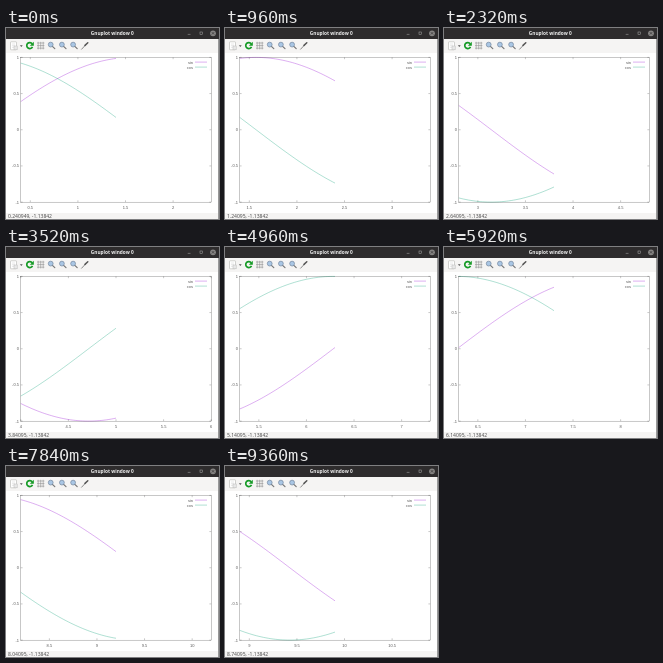
These frames come from a looping animation (213 by 191 pixels, 9520 ms). An HTML page:

```html
<!DOCTYPE html>
<html lang="en">
<head>
<meta charset="utf-8">
<title>Sine and cosine plot</title>
<style>
html, body { margin: 0; width: 100%; height: 100%; overflow: hidden; background: #fff; }
svg { display: block; width: 100vw; height: 100vh; }
.ui { font-family: "Open Sans", "Liberation Sans", sans-serif; }
.plot { font: 4px "Liberation Sans", Arial, sans-serif; fill: #555; }
.axis { fill: none; stroke: #000; stroke-width: .22; }
.sin, .cos { fill: none; stroke-width: .32; }
.sin { stroke: #9400d3; }
.cos { stroke: #009e73; }
.mid { text-anchor: middle; }
.end { text-anchor: end; }
</style>
</head>
<body>
<svg viewBox="0 0 213 191" xmlns="http://www.w3.org/2000/svg">
  <defs>
    <g id="lens">
      <path d="M1 1 L3.4 3.4" stroke="#777" stroke-width="1.2" stroke-linecap="round"/>
      <circle cx="-.7" cy="-.7" r="2.4" fill="#a9c6e4" stroke="#70859c" stroke-width=".7"/>
    </g>
  </defs>
  <rect width="213" height="191" fill="#fff"/>

  <rect width="213" height="11" fill="#2e2c2d"/>
  <text class="ui mid" x="106.3" y="7.1" font-size="4.75" font-weight="700" fill="#f0f0f0">Gnuplot window 0</text>
  <g fill="none" stroke="#aaa" stroke-width=".5">
    <path d="M181.7 6.4h2.8"/>
    <rect x="194" y="4" width="2.6" height="2.6"/>
  </g>
  <circle cx="207" cy="5.3" r="2.9" fill="#858382"/>
  <path d="M205.8 4.1l2.4 2.4m0-2.4l-2.4 2.4" stroke="#2e2c2d" stroke-width=".6"/>

  <rect y="11" width="213" height="14" fill="#f5f4f3"/>
  <g>
    <rect x="4.5" y="13.8" width="6" height="8" rx=".6" fill="#fff" stroke="#b4b4b0" stroke-width=".6"/>
    <path d="M6 16h3M6 17.7h3M6 19.4h2" stroke="#d0d0d0" stroke-width=".5"/>
    <rect x="8" y="18" width="3.2" height="3.8" fill="#e8e8e8" stroke="#bbb" stroke-width=".5"/>
    <path d="M13.9 17.2h2.8l-1.4 1.7z" fill="#555"/>
    <path d="M26.2 15.8A3 3 0 1 0 26.5 18.8" fill="none" stroke="#159a25" stroke-width="1.7"/>
    <path d="M27.8 13.8v4h-4z" fill="#159a25"/>
    <path d="M31 15h7.4M31 17.6h7.4M31 20.2h7.4M32.2 13.8v7.6M34.7 13.8v7.6M37.2 13.8v7.6" stroke="#909090" stroke-width=".6"/>
    <use href="#lens" x="45.4" y="17.3"/>
    <use href="#lens" x="56.6" y="17.3"/>
    <use href="#lens" x="67.8" y="17.3"/>
    <path d="M75.6 21.2l3.8-4" stroke="#888" stroke-width="1" stroke-linecap="round"/>
    <path d="M79 17.4l2.8-2.6" stroke="#555" stroke-width="1.5" stroke-linecap="round"/>
  </g>

  <g class="plot">
    <g id="yaxis"></g>
    <g id="xaxis"></g>
    <path id="sin" class="sin"/>
    <path id="cos" class="cos"/>
    <rect class="axis" x="14.8" y="29.4" width="190.4" height="144.7"/>
    <text class="end" x="187" y="35.5">sin</text>
    <path class="sin" d="M189 34.1h12"/>
    <text class="end" x="187" y="40.5">cos</text>
    <path class="cos" d="M189 39.1h12"/>
  </g>

  <rect y="185" width="213" height="6" fill="#f5f4f3"/>
  <text id="status" class="ui" x="2" y="189.5" font-size="5" fill="#444"></text>
  <rect x="212" y="11" width="1" height="180" fill="#999"/>
</svg>
<script>
const LOOP = 9520, FRAME = 80;
const LEFT = 14.8, WIDTH = 190.4, MID = 101.75, HALF = 72.35, BOTTOM = MID + HALF;
// [time in ms, number of 0.1 scroll steps]
const PACE = [[0, 0], [960, 10], [2320, 24], [3520, 36], [4960, 49], [5760, 58], [6800, 68], [8500, 85], [LOOP, 85]];
const $ = id => document.getElementById(id);
const label = (x, y, cls, s) => `<text class="${cls}" x="${x}" y="${y}">${s}</text>`;
const tick = d => `<path class="axis" d="${d}"/>`;
const yPos = v => MID - v * HALF;

$('yaxis').innerHTML = [1, .5, 0, -.5, -1].map(v => {
  const y = yPos(v);
  return tick(`M${LEFT} ${y}h1.8M${LEFT + WIDTH} ${y}h-1.8`) + label(13, y + 1.4, 'end', v);
}).join('');

function stepsAt(t) {
  const i = PACE.findIndex(p => p[0] > t);
  const [t0, n0] = PACE[i - 1], [t1, n1] = PACE[i];
  return Math.floor(n0 + (n1 - n0) * (t - t0) / (t1 - t0) + .3);
}

function curve(fn, min) {
  let d = '';
  for (let i = 0; i <= 40; i++) {
    const u = i / 40;
    d += (i ? 'L' : 'M') + (LEFT + u * WIDTH / 2).toFixed(2) + ' ' + yPos(fn(min + u)).toFixed(2);
  }
  return d;
}

function xAxis(min) {
  // rounding can leave the span just under 2, which gives denser tics
  const gap = min > 6 && min + 2 - min < 2 ? 2 : 5;
  const first = Math.round(min * 10);
  let out = '';
  for (let n = Math.ceil(first / gap) * gap; n <= first + 20; n += gap) {
    const x = LEFT + (n - first) / 20 * WIDTH;
    out += tick(`M${x} ${BOTTOM}v-1.8M${x} ${BOTTOM - 2 * HALF}v1.8`) + label(x, 180.6, 'mid', n / 10);
  }
  return out;
}

let shown = -1;
function draw(steps) {
  if (steps === shown) return;
  shown = steps;
  const min = (4 + steps) / 10;
  $('xaxis').innerHTML = xAxis(min);
  $('sin').setAttribute('d', curve(Math.sin, min));
  $('cos').setAttribute('d', curve(Math.cos, min));
  $('status').textContent = (min - .159051).toPrecision(6) + ', -1.13842';
}

const start = performance.now();
function run(now) {
  const t = Math.max(0, now - start) % LOOP;
  draw(stepsAt(Math.floor(t / FRAME) * FRAME));
  requestAnimationFrame(run);
}
draw(0);
requestAnimationFrame(run);
</script>
</body>
</html>
```
